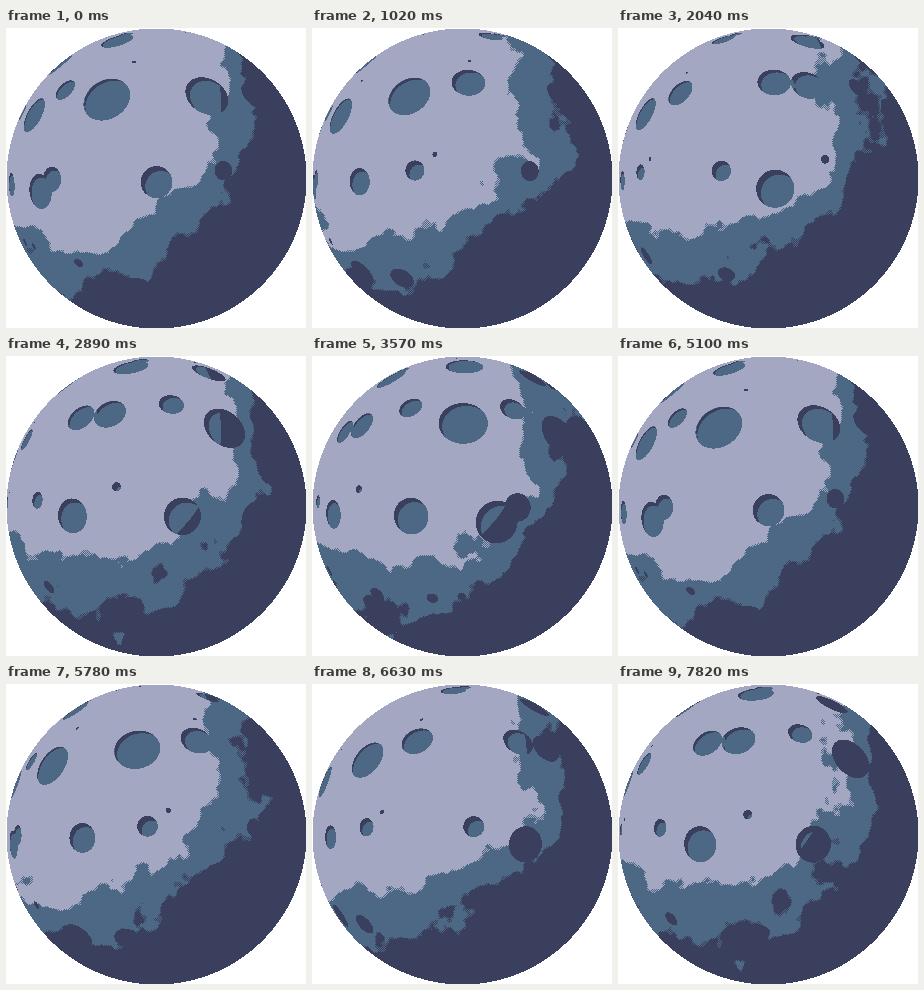
Recreate the animation shown at these times as an HTML page with a canvas. Size 300x300 px, loop 7990 ms.

```html
<!DOCTYPE html>
<html lang="en">
<head>
<meta charset="utf-8">
<title>Rotating moon</title>
<style>
  html, body { margin: 0; width: 100%; height: 100%; overflow: hidden; background: #fff; }
  canvas { display: block; width: 100%; height: 100%; image-rendering: pixelated; }
</style>
</head>
<body>
<canvas id="moon" width="300" height="300"></canvas>
<script>
const SIZE = 300, STEP_MS = 170, STEPS = 47;
const SEED = 7.49;
const LIGHT = 0.25;                       // light sits at (LIGHT, LIGHT)
const GROUND_CELLS = 8, CRATER_CELLS = 5;
const STEPS_PER_TURN = 30;
const MID_BORDER = 0.615, DARK_BORDER = 0.729, CRATER_BORDER = 0.465;
const DITHER = 2 / SIZE;

// Little-endian ABGR
const color = (r, g, b) => (255 << 24 | b << 16 | g << 8 | r) >>> 0;
const LIT = color(0xa3, 0xa7, 0xc2);
const MID = color(0x4c, 0x68, 0x85);
const DARK = color(0x3a, 0x3f, 0x5e);

const fract = v => v - Math.floor(v);

// Tiling grid of seeded random values
function randomGrid(n) {
  return Float64Array.from({ length: n * n }, (_, k) => {
    const x = k % n, y = Math.floor(k / n);
    return fract(Math.sin(12.9898 * x + 78.233 * y) * 15.5453 * SEED);
  });
}
const groundGrid = randomGrid(GROUND_CELLS);
const craterGrid = randomGrid(CRATER_CELLS);

function noise(x, y) {
  const ix = Math.floor(x), iy = Math.floor(y);
  const fx = x - ix, fy = y - iy;
  const sx = fx * fx * (3 - 2 * fx), sy = fy * fy * (3 - 2 * fy);
  const x0 = ix & 7, x1 = (ix + 1) & 7;
  const row0 = (iy & 7) * GROUND_CELLS, row1 = ((iy + 1) & 7) * GROUND_CELLS;
  const top = groundGrid[row0 + x0] * (1 - sx) + groundGrid[row0 + x1] * sx;
  const bottom = groundGrid[row1 + x0] * (1 - sx) + groundGrid[row1 + x1] * sx;
  return top + (bottom - top) * sy;
}

function fbm(x, y) {
  let sum = 0;
  for (let scale = 0.5; scale > 0.05; scale /= 2) {
    sum += noise(x, y) * scale;
    x *= 2;
    y *= 2;
  }
  return sum;
}

// 0 inside a crater, 1 outside, with a thin soft rim
function craterLayer(x, y) {
  const row = Math.floor(y);
  x += row * 0.31;
  const col = Math.floor(x);
  const h = craterGrid[(row % CRATER_CELLS) * CRATER_CELLS + col % CRATER_CELLS];
  const r = h * 0.25, center = 0.25 + h * 0.5;
  const m = Math.hypot(x - col - center, y - row - center);
  if (m >= r) return 1;
  if (m <= 0.9 * r) return 0;
  const k = (m - 0.9 * r) / (0.1 * r);
  return k * k * (3 - 2 * k);
}

function crater(u, v, shift) {
  const x = u * CRATER_CELLS + shift, y = v * CRATER_CELLS;
  return 1 - craterLayer(x + 11, y + 11) * craterLayer(x + 12, y + 12);
}

// Everything about a pixel that does not change over time
const pixels = [];
for (let j = 0; j < SIZE; j++) {
  for (let i = 0; i < SIZE; i++) {
    const u = i / SIZE, v = j / SIZE;
    if (Math.hypot(u - 0.5, v - 0.5) > 0.49999) continue;
    const px = u * 2 - 1, py = v * 2 - 1;
    const bulge = 1 + Math.sqrt(Math.max(0, 1 - px * px - py * py));
    const warp = fbm(u, v);
    pixels.push({
      index: j * SIZE + i,
      light: Math.hypot(u - LIGHT, v - LIGHT),
      groundX: u * GROUND_CELLS + warp,
      groundY: v * GROUND_CELLS + warp,
      sphereU: px / bulge / 2 + 0.5,
      sphereV: py / bulge / 2 + 0.5,
      even: (i + j) % 2 === 0
    });
  }
}

function groundColor(p, shift) {
  const d = p.light + fbm(p.groundX + shift, p.groundY) * 0.3;
  let c = LIT;
  if (d > MID_BORDER) c = d < MID_BORDER + DITHER && p.even ? LIT : MID;
  if (d > DARK_BORDER) c = d < DARK_BORDER + DITHER && p.even ? MID : DARK;
  return c;
}

function pixelColor(p, turn) {
  const shift = turn * CRATER_CELLS;
  const depth = crater(p.sphereU, p.sphereV, shift);
  if (depth < 0.5) return groundColor(p, turn * GROUND_CELLS);
  if (p.light > CRATER_BORDER) return DARK;
  const offset = (LIGHT - 0.5) * 0.03;
  const shadow = crater(p.sphereU + offset, p.sphereV + offset, shift);
  return shadow < depth - (0.5 - p.light) * 2 ? DARK : MID;
}

const ctx = document.getElementById('moon').getContext('2d');
const image = ctx.createImageData(SIZE, SIZE);
const buffer = new Uint32Array(image.data.buffer);

function draw(step) {
  const turn = (step % STEPS_PER_TURN) / STEPS_PER_TURN;
  for (const p of pixels) buffer[p.index] = pixelColor(p, turn);
  ctx.putImageData(image, 0, 0);
}

const start = performance.now();
let shown = -1;
function tick() {
  const step = Math.floor((performance.now() - start) / STEP_MS) % STEPS;
  if (step !== shown) draw(shown = step);
  requestAnimationFrame(tick);
}
tick();
</script>
</body>
</html>
```
